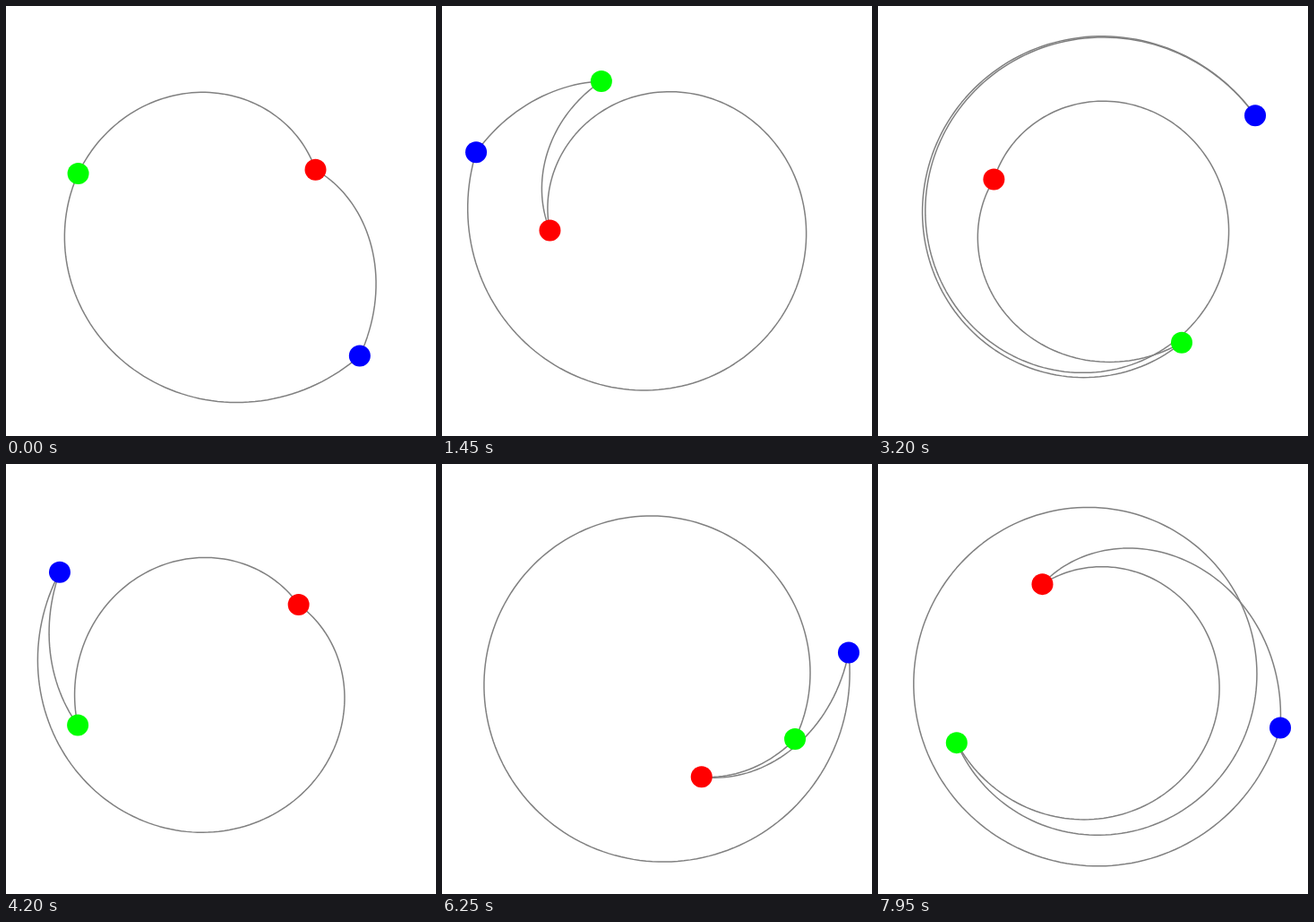
Recreate the animation shown at these times as an HTML page with a canvas. Size 480 by 480 pixels, loop 8 s.

```html
<!DOCTYPE html>
<html>
<head>
<meta charset="utf-8">
<style>
html, body { margin: 0; width: 100%; height: 100%; overflow: hidden; background: #fff; }
canvas { display: block; }
</style>
</head>
<body>
<canvas id="stage" width="480" height="480"></canvas>
<script>
const ctx = document.getElementById('stage').getContext('2d');
const CENTER = 240, LOOP = 8000, FRAME = 50, SPEED = 5.4; // degrees per step

// Each dot circles at constant speed and reverses at its turn steps.
const red = { color: '#f00', radius: 120, start: -28.45, dir: -1, turns: [44.42, 116.62] };
const green = { color: '#0f0', radius: 168, start: -161.6, dir: 1, turns: [19.12, 65.48, 156.17] };
const blue = { color: '#00f', radius: 216, start: 44.2, dir: 1, turns: [58.68, 141.92] };
const dots = [red, green, blue];

// The third value is the extra winding of the link, in degrees.
const links = [[red, green, 0], [red, blue, 0], [green, blue, 360]];

function angleAt(dot, step) {
  let travelled = 0, last = 0, dir = dot.dir;
  for (const turn of dot.turns) {
    if (turn >= step) break;
    travelled += dir * (turn - last);
    last = turn;
    dir = -dir;
  }
  return dot.start + SPEED * (travelled + dir * (step - last));
}

function point(radius, degrees) {
  const a = degrees * Math.PI / 180;
  return [CENTER + radius * Math.cos(a), CENTER + radius * Math.sin(a)];
}

function drawLink([from, to, winding], step) {
  const a = angleAt(from, step) + winding, b = angleAt(to, step);
  const count = Math.ceil(Math.abs(b - a) / 2) + 1;
  ctx.beginPath();
  for (let i = 0; i <= count; i++) {
    const k = i / count;
    ctx.lineTo(...point(from.radius + (to.radius - from.radius) * k, a + (b - a) * k));
  }
  ctx.stroke();
}

function drawDot(dot, step) {
  ctx.fillStyle = dot.color;
  ctx.beginPath();
  ctx.arc(...point(dot.radius, angleAt(dot, step)), 12, 0, 2 * Math.PI);
  ctx.fill();
}

function draw(now) {
  const n = Math.floor(now % LOOP / FRAME);
  const step = n + (n > 58) + (n > 64); // the motion skips one step twice
  ctx.fillStyle = '#fff';
  ctx.fillRect(0, 0, 480, 480);
  ctx.strokeStyle = '#808080';
  ctx.lineWidth = 1.5;
  ctx.lineJoin = 'round';
  links.forEach(link => drawLink(link, step));
  dots.forEach(dot => drawDot(dot, step));
}

const begin = performance.now();
function tick() {
  draw(performance.now() - begin);
  requestAnimationFrame(tick);
}
tick();
</script>
</body>
</html>
```
